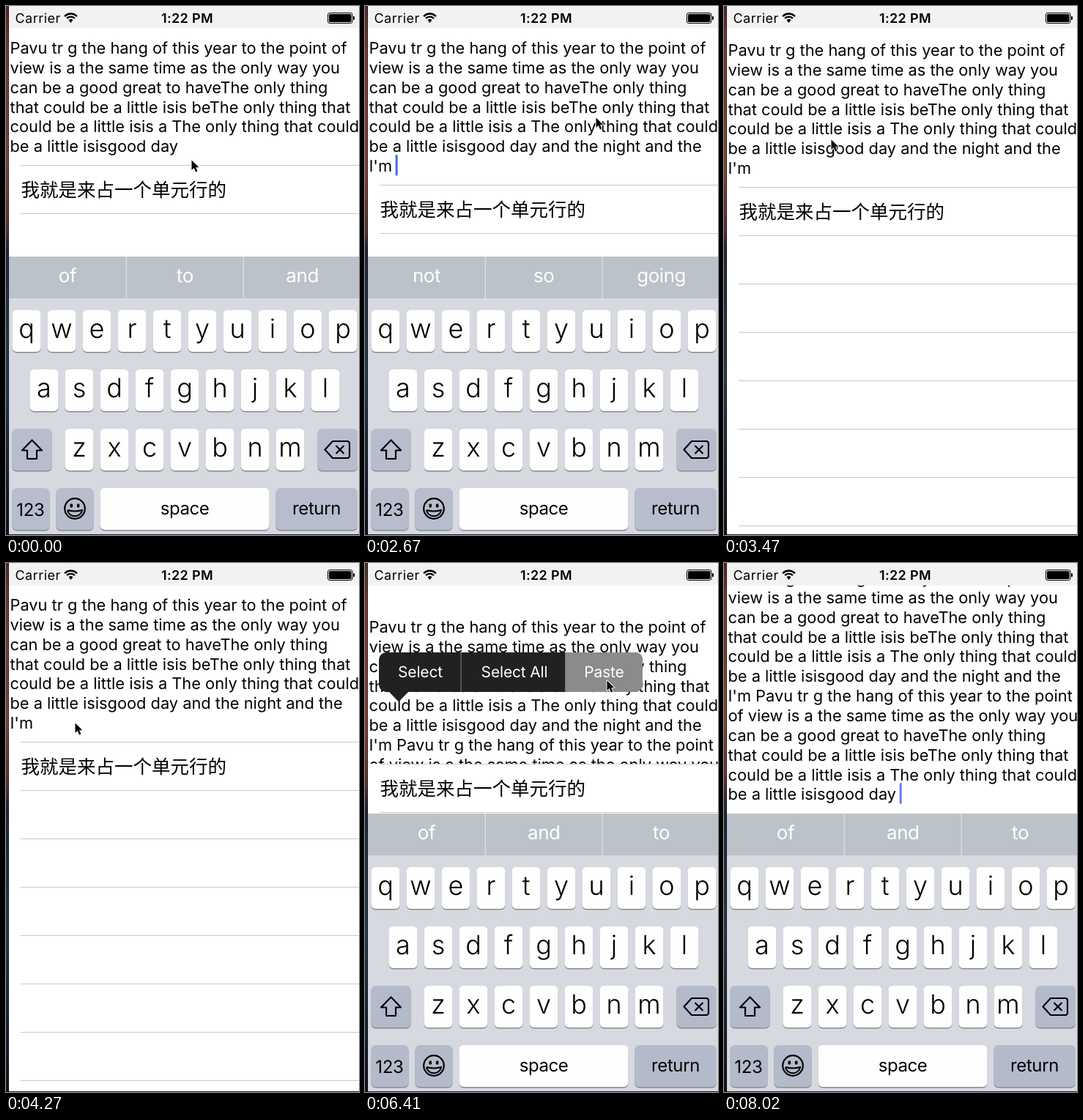
Write an HTML page with a canvas that moves like this. It is 482 px wide and 722 px high and loops after 8.12 s.

```html
<!DOCTYPE html>
<html lang="en">
<head>
<meta charset="utf-8">
<title>Growing text cell</title>
<style>
html, body { margin: 0; width: 100%; height: 100%; overflow: hidden; }
canvas { display: block; }
</style>
</head>
<body>
<canvas id="stage" width="482" height="722"></canvas>
<script>
const ctx = document.getElementById('stage').getContext('2d');
const LOOP = 8120, LINE = 26.85, FIRST_BASELINE = 65, ROW = 66;

const intro = [
  'Pavu tr g the hang of this year to the point of',
  'view is a the same time as the only way you',
  'can be a good great to haveThe only thing',
  'that could be a little isis beThe only thing that',
  'could be a little isis a The only thing that could'
];
const ending = 'be a little isisgood day ';
const typed = (more = '', ...lines) => [...intro, ending + more, ...lines];
const full = typed('and the night and the ', "I'm ");
const pasted = [
  ...full.slice(0, 6),
  "I'm Pavu tr g the hang of this year to the point",
  'of view is a the same time as the only way you',
  ...intro.slice(2), ending
];

// Each step overrides part of the state and holds until the next one.
const steps = [
  { at: 0, lines: typed(), cellLines: 6, caret: 0, mouse: [253, 210], words: ['of', 'to', 'and'],
    offset: 0, keyboard: 0, menu: 0, loupe: false, grey: '#b8bdcd' },
  { at: 270, caret: 1, mouse: [254, 222] },
  { at: 540, mouse: [387, 436] },
  { at: 800, caret: 0, mouse: [378, 381] },
  { at: 1070, caret: 1, lines: typed('and '), words: ['I', 'to', 'the'], mouse: [375, 372] },
  { at: 1330, lines: typed('and the '), words: ['I', 'night', ''], mouse: [375, 368] },
  { at: 1600, lines: typed('and the night '), words: ['I', '', ''], mouse: [374, 366] },
  { at: 1870, lines: typed('and the night and '), words: ['which', 'to', 'the'] },
  { at: 2130, lines: typed('and the night and the '), words: ['same', 'first', "I'm"] },
  { at: 2400, lines: full, cellLines: 7, words: ['not', 'so', 'going'] },
  { at: 2670, mouse: [315, 152] },
  { at: 2930, caret: 0, offset: 28, keyboard: 230, mouse: [225, 168] },
  { at: 3200, offset: 46, keyboard: 380, mouse: [158, 200] },
  { at: 3470, offset: 3, mouse: [146, 182] },
  { at: 3740, offset: 0, mouse: [133, 216] },
  { at: 4010, mouse: [110, 219] },
  { at: 4270, mouse: [94, 218] },
  { at: 4540, keyboard: 110, caret: 1, mouse: [98, 217], grey: '#b3bbcb' },
  { at: 4800, keyboard: 0, mouse: [99, 217] },
  { at: 5070, caret: 0.12 },
  { at: 5340, caret: 1, loupe: true },
  { at: 5610, loupe: false, menu: 1, mouse: [101, 217] },
  { at: 5880, caret: 0, mouse: [210, 186] },
  { at: 6140, caret: 1, mouse: [324, 154] },
  { at: 6410, caret: 0, menu: 2, lines: pasted, offset: 30, words: ['of', 'and', 'to'], mouse: [330, 160] },
  { at: 6680, caret: 1, menu: 0, cellLines: 12, offset: -33 },
  { at: 6950, offset: -37, mouse: null },
  { at: 7210, caret: 0 },
  { at: 7480, mouse: [436, 669] },
  { at: 7750, caret: 0.85, mouse: [452, 720] },
  { at: 8020, mouse: null }
];

function stateAt(ms) {
  return Object.assign({}, ...steps.filter(step => step.at <= ms));
}

function rect(x, y, w, h, color) {
  ctx.fillStyle = color;
  ctx.fillRect(x, y, w, h);
}

function round(x, y, w, h, radius, color) {
  ctx.beginPath();
  ctx.roundRect(x, y, w, h, radius);
  ctx.fillStyle = color;
  ctx.fill();
}

function trace(points, close = true) {
  ctx.beginPath();
  points.forEach(([x, y]) => ctx.lineTo(x, y));
  if (close) ctx.closePath();
}

function clipped(x, y, w, h, draw) {
  ctx.save();
  ctx.beginPath();
  ctx.rect(x, y, w, h);
  ctx.clip();
  draw();
  ctx.restore();
}

// Text is set at a fixed optical size and scaled evenly; returns the advance.
function label(text, x, y, size, { weight = 400, spacing = -0.017, align = 'left', color = '#000' } = {}) {
  const base = size > 30 ? 32 : 14, scale = size / base;
  ctx.save();
  ctx.translate(x, y);
  ctx.scale(scale, scale);
  ctx.font = `${weight} ${base}px Inter, "Liberation Sans", sans-serif`;
  ctx.textRendering = 'geometricPrecision';
  ctx.letterSpacing = `${spacing * base}px`;
  ctx.textAlign = align;
  ctx.fillStyle = color;
  ctx.fillText(text, 0, 0);
  const advance = ctx.measureText(text).width * scale;
  ctx.restore();
  return advance;
}

function drawTable(s) {
  const bottom = Math.ceil(217 + (s.cellLines - 6) * LINE) + s.offset;
  rect(4, 30, 478, 691, '#fff');
  clipped(4, 30, 478, bottom - 30, () => {
    let width = 0;
    s.lines.forEach((line, i) => {
      width = label(line, 5.5, FIRST_BASELINE + s.offset + i * LINE, 21.8, { spacing: 0 });
    });
    const top = FIRST_BASELINE + s.offset + (s.lines.length - 1) * LINE - 23;
    ctx.globalAlpha = s.caret;
    round(4 + width, top, 3, 28.5, 1, '#4c66e6');
  });
  for (let y = bottom; y < 721; y += ROW) rect(20, y, 462, 1, '#c8c7cc');
  ctx.font = '25.5px "Noto Sans CJK SC", "Noto Sans CJK", sans-serif';
  ctx.fillStyle = '#000';
  ctx.fillText('我就是来占一个单元行的', 20.5, bottom + 42.5);
}

function drawStatus() {
  rect(4, 0, 478, 30.5, '#f2f2f2');
  label('Carrier', 12.5, 23, 18, { spacing: 0.026 });
  label('1:22 PM', 247.5, 23, 18, { weight: 600, spacing: 0.02, align: 'center' });
  ctx.strokeStyle = '#000';
  ctx.lineWidth = 2.4;
  for (const r of [11.5, 7.4]) {
    ctx.beginPath();
    ctx.arc(88.5, 22, r, -Math.PI * 0.76, -Math.PI * 0.24);
    ctx.stroke();
  }
  ctx.beginPath();
  ctx.moveTo(88.5, 23);
  ctx.arc(88.5, 22, 4, -Math.PI * 0.76, -Math.PI * 0.24);
  ctx.fillStyle = '#000';
  ctx.fill();
  ctx.beginPath();
  ctx.roundRect(439.5, 9.5, 33.5, 14, 2.5);
  ctx.lineWidth = 1;
  ctx.stroke();
  round(441, 11, 30.5, 11, 1.5, '#000');
  round(474, 14, 2, 5, 1, '#000');
}

function key(x, y, w, color = '#fefefe') {
  round(x, y + 1.5, w, 57, 6, '#898c91');
  round(x, y, w, 57, 6, color);
}

function drawIcons() {
  ctx.strokeStyle = ctx.fillStyle = '#000';
  ctx.lineWidth = 2.2;
  ctx.lineJoin = 'round';
  trace([[35.5, 592.5], [49, 606.5], [42, 606.5], [42, 618], [29, 618], [29, 606.5], [22, 606.5]]);
  ctx.stroke();
  trace([[435.5, 605.5], [446, 594], [467, 594], [469, 596], [469, 615], [467, 617], [446, 617]]);
  ctx.stroke();
  trace([[450.5, 600], [461.5, 611]], false);
  ctx.stroke();
  trace([[461.5, 600], [450.5, 611]], false);
  ctx.stroke();
  ctx.beginPath();
  ctx.arc(94, 686, 13.8, 0, Math.PI * 2);
  ctx.stroke();
  for (const x of [89.3, 98.7]) {
    ctx.beginPath();
    ctx.ellipse(x, 682, 1.9, 2.8, 0, 0, Math.PI * 2);
    ctx.fill();
  }
  ctx.beginPath();
  ctx.moveTo(84, 688);
  ctx.quadraticCurveTo(94, 691, 104, 688);
  ctx.bezierCurveTo(102, 699, 86, 699, 84, 688);
  ctx.stroke();
}

function drawKeyboard(s) {
  ctx.save();
  ctx.translate(0, s.keyboard);
  rect(4, 342, 478, 379, '#d6d9e0');
  rect(4, 342, 478, 57, '#bbc2c9');
  for (const x of [163.5, 323.5]) rect(x, 342, 1.5, 57, '#d9dde1');
  s.words.forEach((word, i) =>
    label(word, 84 + i * 160.3, 377, 26, { align: 'center', color: '#fff' }));

  [['qwertyuiop', 8.5], ['asdfghjkl', 32.5], ['zxcvbnm', 80.5]].forEach(([letters, left], row) => {
    [...letters].forEach((letter, i) => {
      const x = left + i * 48, y = 415 + row * 81;
      key(x, y, 39);
      label(letter, x + 19.5, y + 38, 36, { weight: 350, spacing: 0, align: 'center' });
    });
  });
  key(8.5, 577, 54, s.grey);
  key(425.5, 577, 54.5, s.grey);
  key(8.5, 658, 51, s.grey);
  key(68.5, 658, 51, s.grey);
  key(128.5, 658, 231);
  key(368.5, 658, 111.5, s.grey);
  label('123', 33.3, 696, 24, { align: 'center' });
  label('space', 244, 694, 24, { align: 'center' });
  label('return', 424, 694, 24, { align: 'center' });
  drawIcons();
  ctx.restore();
}

function drawMenu(pressed) {
  const dark = '#212121';
  round(19, 122, 360, 54, 10, dark);
  trace([[32, 175], [60, 175], [46, 189.5]]);
  ctx.fill();
  if (pressed) round(273.5, 122, 105.5, 54, [0, 10, 10, 0], '#8b8b8b');
  for (const x of [130.5, 273]) rect(x, 122, 1.2, 54, '#777');
  [['Select', 75.5], ['Select All', 204], ['Paste', 326.5]].forEach(([text, x]) =>
    label(text, x, 156, 21, { align: 'center', color: '#fff', spacing: -0.008 }));
}

function drawLoupe(s) {
  const x = 102, y = 126, radius = 86;
  ctx.save();
  ctx.beginPath();
  ctx.arc(x, y, radius, 0, Math.PI * 2);
  ctx.clip();
  rect(x - radius, y - radius, radius * 2, radius * 2, '#fff');
  ctx.translate(x, y);
  ctx.scale(1.25, 1.25);
  ctx.translate(-99, -217);
  drawTable(s);
  ctx.restore();
  ctx.beginPath();
  ctx.arc(x, y, radius - 1, 0, Math.PI * 2);
  ctx.strokeStyle = '#a9acb0';
  ctx.lineWidth = 3;
  ctx.stroke();
}

function drawMouse([x, y]) {
  ctx.save();
  ctx.translate(x, y);
  trace([[0.5, 0.5], [0.5, 14], [3.7, 11], [6, 16.5], [8.4, 15.5], [6.1, 10.2], [10.4, 10.2]]);
  ctx.lineJoin = 'round';
  ctx.strokeStyle = '#fff';
  ctx.lineWidth = 1.8;
  ctx.stroke();
  ctx.fillStyle = '#000';
  ctx.fill();
  ctx.restore();
}

function drawDesktop() {
  const g = ctx.createLinearGradient(0, 0, 0, 722);
  [[0, '#4a2926'], [0.08, '#6e372f'], [0.3, '#7c3f35'], [0.42, '#5a2f2c'],
   [0.46, '#1d2635'], [0.7, '#26384a'], [1, '#0d131c']].forEach(([p, c]) => g.addColorStop(p, c));
  rect(0, 0, 482, 722, g);
  rect(3, 0, 1, 722, 'rgba(0,0,0,.35)');
  rect(4, 721, 478, 1, '#151a22');
}

function render() {
  const s = stateAt(performance.now() % LOOP);
  drawDesktop();
  clipped(4, 0, 478, 721, () => {
    drawTable(s);
    drawStatus();
    if (s.keyboard < 379) drawKeyboard(s);
    if (s.menu) drawMenu(s.menu === 2);
    if (s.loupe) drawLoupe(s);
  });
  if (s.mouse) drawMouse(s.mouse);
  requestAnimationFrame(render);
}
render();
</script>
</body>
</html>
```
